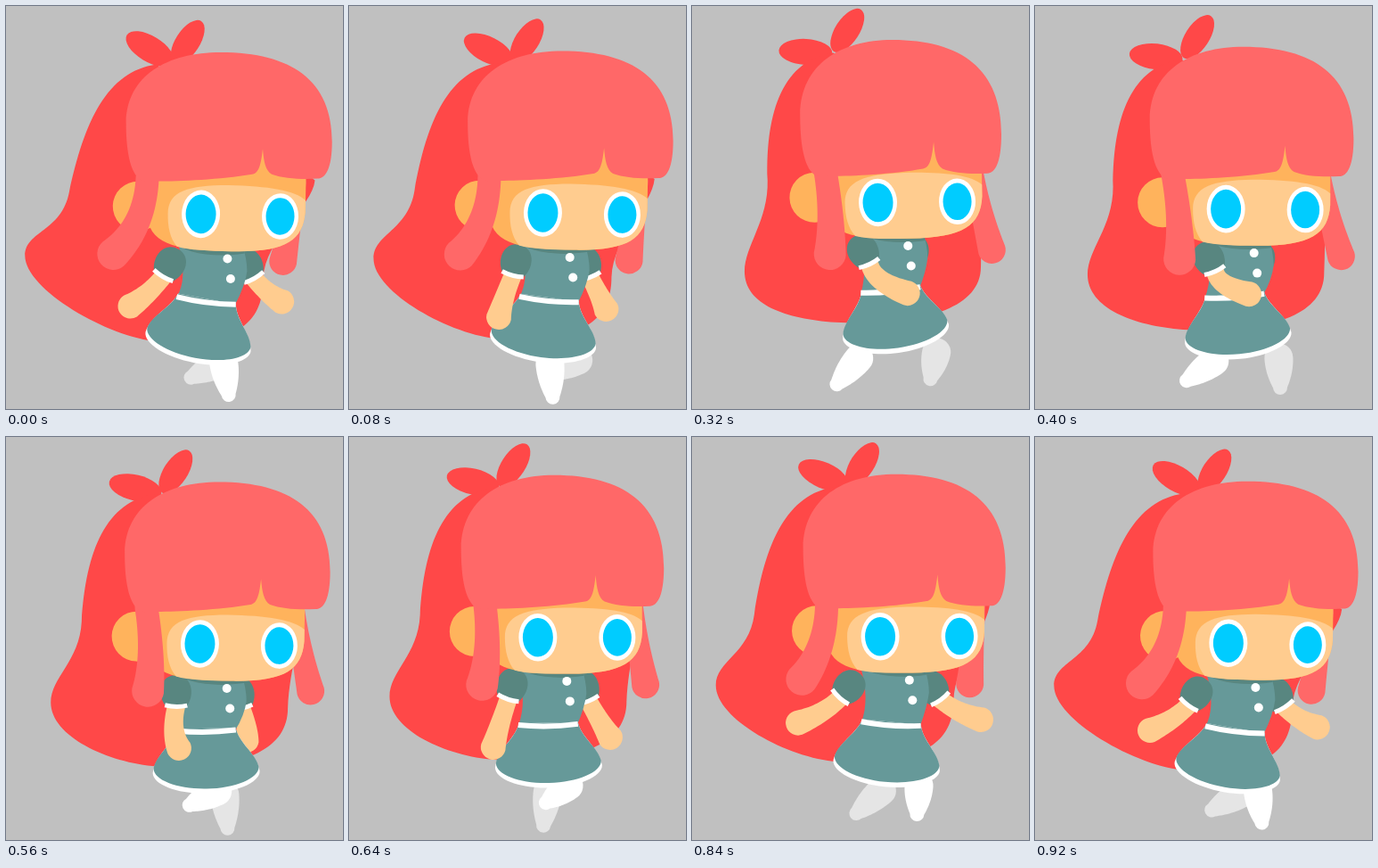
An HTML page with a canvas that plays this animation: 378 by 452 pixels, repeating every 0.96 s.

```html
<!DOCTYPE html>
<html lang="en">
<head>
<meta charset="utf-8">
<title>Walk cycle</title>
<style>
  html, body { margin: 0; width: 100%; height: 100%; overflow: hidden; background: #c0c0c0; }
  canvas { display: block; width: 378px; height: 452px; }
</style>
</head>
<body>
<canvas id="stage" width="378" height="452"></canvas>
<script>
const g = document.getElementById('stage').getContext('2d');
const LOOP = 960, STEP = 40;
const HAIR = '#ff4848', PINK = '#ff6868', SKIN = '#ffcc8f', SHADE = '#ffb35c';
const DRESS = '#669999', DARK = '#588680', FAR = '#e5e5e5', WHITE = '#fff';

const rad = deg => deg * Math.PI / 180;
const cos = deg => Math.cos(rad(deg));

// All motion comes from the walk angle w, 0 to 360 over one loop.
const bobAt = w => cos(2 * w - 19);

function pose(w) {
  const bob = bobAt(w);
  return {
    w, bob,
    sway: .5 + 8.2 * cos(w + 21) + 4.5 * bob,
    swing: cos(w - 132),
    lift: cos(2 * w - 120),
    head: [213 + 5.9 * bob, 226.2 + 7.6 * bob],
    button: [245 + 3.6 * bob, 275.5 + 8.5 * bob],
    waist: [223 + bob, 324.8 + 6.9 * bob]
  };
}

function place(x, y, deg, draw) {
  g.save();
  g.translate(x, y);
  g.rotate(rad(deg));
  draw();
  g.restore();
}

function fill(d, color) {
  g.fillStyle = color;
  g.fill(new Path2D(d));
}

function oval(x, y, rx, ry, color, deg = 0) {
  g.fillStyle = color;
  g.beginPath();
  g.ellipse(x, y, rx, ry, rad(deg), 0, 7);
  g.fill();
}

function line(d, width) {
  g.strokeStyle = WHITE;
  g.lineWidth = width;
  g.stroke(new Path2D(d));
}

// Tapered, round-ended limb bent along a quadratic curve.
function limb(x0, y0, ex, ey, x1, y1, r0, r1, color) {
  const start = Math.atan2(ey - y0, ex - x0), end = Math.atan2(y1 - ey, x1 - ex);
  const N = 20, Q = Math.PI / 2;
  const side = (k, s) => {
    const u = k / N, v = 1 - u, r = r0 + (r1 - r0) * u * u;
    const dx = v * (ex - x0) + u * (x1 - ex), dy = v * (ey - y0) + u * (y1 - ey);
    const l = s * r / Math.hypot(dx, dy);
    g.lineTo(v * v * x0 + 2 * u * v * ex + u * u * x1 + dy * l,
      v * v * y0 + 2 * u * v * ey + u * u * y1 - dx * l);
  };
  g.beginPath();
  for (let k = 0; k <= N; k++) side(k, 1);
  g.arc(x1, y1, r1, end - Q, end + Q);
  for (let k = N; k >= 0; k--) side(k, -1);
  g.arc(x0, y0, r0, start + Q, start + 3 * Q);
  g.fillStyle = color;
  g.fill();
}

function leg(w, dx, color) {
  const bob = bobAt(w);
  const hx = 226 + dx + 34 * cos(w - 290) + 7 * bob, hy = 395.5 + 5 * bob + 4 * cos(w - 90);
  const x = 211 + dx + 44 * cos(w - 315) + 8 * bob, y = 423.5 + 13.3 * cos(w - 43) + 3 * bob;
  limb(hx, hy, (hx + x) / 2, (hy + y) / 2, x, y, 16, 8, color);
}

// Forearm from cuff to hand, with a puffed sleeve above the cuff.
function arm(cuff, hand, bend, deg, flip) {
  const [x, y] = cuff, [hx, hy] = hand;
  limb(x, y, (x + hx) / 2 + bend, (y + hy) / 2 + 4, hx, hy, 10, 14, SKIN);
  place(x, y, deg, () => {
    g.scale(flip, 1);
    fill('M-13 0C-23-14-18-34-1-34C16-34 21-14 12 0Z', DARK);
    line('M-13 0Q0 3 12 0', 5);
  });
}

function nearArm({ swing, lift, button: [x, y] }) {
  arm([x - 60 + 17 * swing, y + 19], [181 + 62 * swing, y + 60 + 14 * lift],
    -6 - 12 * swing, 8 - 34 * swing, 1);
}

function farArm({ swing, lift, button: [x, y] }) {
  arm([x + 19 - 15 * swing, y + 21], [279 - 45 * swing, y + 53 + 10 * lift],
    4 + 8 * swing, -16 + 20 * swing, -1);
}

const skirt = (x, y, low) =>
  `M-32-3C-37 14-${x - 3} 26-${x} ${y}C-${x} ${y + 13}-32 ${low} 0 ${low}` +
  `S${x} ${y + 13} ${x} ${y}C${x - 3} 26 37 14 34-3Z`;

function body(p) {
  const [bx, by] = p.button, [wx, wy] = p.waist;
  const belt = .6 * p.sway;
  const c = 33 * cos(belt), s = 33 * Math.sin(rad(belt));

  leg(p.w + 180, 20, FAR);
  leg(p.w, 0, WHITE);
  farArm(p);

  const trunk = new Path2D(`M${bx - 55} ${by - 16}Q${bx - 44} ${by + 22} ${wx - c} ${wy - s}` +
    `L${wx + c} ${wy + s}Q${bx + 20} ${by + 30} ${bx + 22} ${by + 14}Q${bx + 22} ${by} ${bx + 16} ${by - 18}Z`);
  g.fillStyle = DRESS;
  g.fill(trunk);
  g.save();
  g.clip(trunk);
  oval(bx - 6, by - 18, 48, 14, DARK);
  g.restore();

  place(wx, wy, .85 * p.sway, () => {
    fill(skirt(60, 46, 70), WHITE);
    fill(skirt(59, 41, 64.5), DRESS);
  });
  place(wx, wy, belt, () => line('M-33-1Q0 3 34-1', 6));
  oval(bx, by, 5, 5, WHITE);
  oval(bx + 3.5, by + 22.5, 5, 5, WHITE);
  nearArm(p);
}

// Long hair: crown, back, outer tip, bottom, front edge, and up behind the face.
function mane({ head: [x, y], sway }) {
  const lean = 6 + .9 * sway;
  const [tx, ty] = [x - 50, y - 168];
  const [bx, by] = [x - 134 - 1.1 * sway, y - 25];
  const [lx, ly] = [x - 170 - 2.2 * sway, y + 64 - 1.4 * sway];
  const [ex, ey] = [x - 48, y + 138 + .4 * sway];
  const [rx, ry] = [x + 96 - 2.1 * sway, y + 72];
  const [sx, sy] = [x + 118 + .8 * sway, y - 38];
  fill(`M${[tx, ty]}` +
    `C${[tx - 55, ty + 8, bx + lean, by - 80, bx, by]}` +
    `C${[bx - lean / 2, by + 45, lx, ly - 28, lx, ly]}` +
    `C${[lx, ly + 38, ex - 55, ey - 4, ex, ey]}` +
    `C${[ex + 90, ey + 4, rx, ry + 50, rx, ry]}` +
    `C${[rx + 2, ry - 45, sx - 3, sy + 30, sx, sy]}Z`, HAIR);
}

function leaves({ head: [x, y], sway }) {
  oval(x - 71 + 1.1 * sway, y - 176 - .75 * sway, 30, 14.5, HAIR, 15 + 1.3 * sway);
  oval(x - 26 + .9 * sway, y - 193, 28, 13.5, HAIR, -57);
}

function eye(x, y, rx, ry) {
  oval(x, y, rx + 4.5, ry + 5, WHITE);
  oval(x, y, rx, ry, '#00ccff');
}

function face({ head: [x, y], bob }) {
  place(x, y, 1.4 * bob, () => {
    g.translate(-215, -230);
    oval(144, 223, 28, 28, SHADE);
    fill('M150 150H332V225C330 258 310 271 250 271C195 271 160 268 155 235Z', SHADE);
    fill('M178 230C178 205 200 198 245 197C290 197 320 201 332 212V225C330 258 310 271 250 271' +
      'C225 271 203 271 189 267C181 258 178 245 178 230Z', SKIN);
    eye(215, 230, 17, 21.8);
    eye(304, 230.5, 16, 20.8);
  });
}

function fringe({ bob }) {
  const left = 127.2 + 7.9 * bob, right = 355.3 + 11 * bob;
  const top = 44.3 + 8.2 * bob, low = 190.3 + 3.5 * bob;
  g.save();
  g.translate(left, top);
  g.scale((right - left) / 229, (low - top) / 144);
  g.translate(-130, -48);
  fill('M147 194C133 185 130 155 130 128C131 75 175 48 235 48C314 48 359 80 359 150' +
    'C359 180 352 192 343 192C325 193 305 192 292 187C285 183 283 172 282 158' +
    'C280 175 278 186 270 187C235 193 190 195 165 195C157 195 151 196 147 194Z', PINK);
  g.restore();
}

function draw(w) {
  const p = pose(w), [x, y] = p.head, drag = 13 * cos(w) + 1.15 * p.sway;
  g.fillStyle = '#c0c0c0';
  g.fillRect(0, 0, 378, 452);

  leaves(p);
  mane(p);

  const farTip = x + 114 - .8 * drag, nearTip = x - 71 - drag;
  limb(x + 107, y - 35, x + 107 + .4 * (farTip - x - 107), y + 10, farTip, y + 53, 11, 15.5, PINK);
  body(p);
  face(p);
  limb(x - 60, y - 41, x - 52 + .27 * (nearTip - x + 60), y + 13,
    nearTip, y + 52 - .6 * p.sway, 13, 18, PINK);
  fringe(p);
}

const begin = performance.now();
function tick() {
  const t = performance.now() - begin;
  draw(Math.floor(t / STEP) * STEP % LOOP / LOOP * 360);
  requestAnimationFrame(tick);
}
tick();
</script>
</body>
</html>
```
